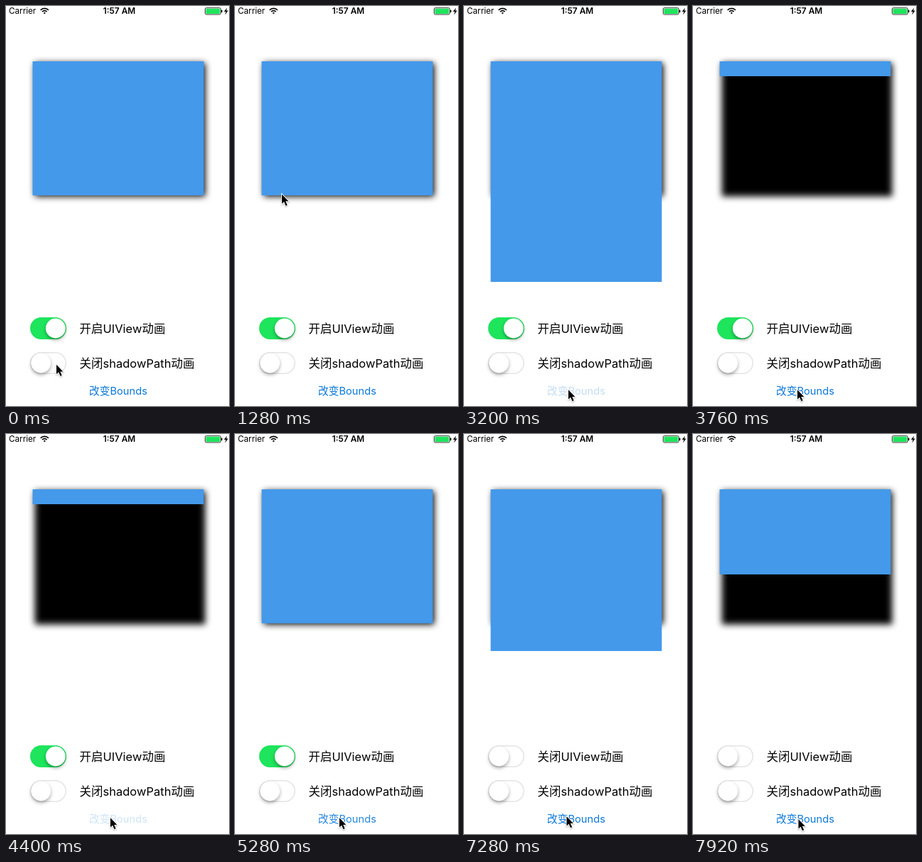
An HTML page with a canvas that plays this animation: 314 by 564 pixels, repeating every 8 s.

```html
<!DOCTYPE html>
<html lang="zh">
<head>
<meta charset="utf-8">
<title>Shadow path demo</title>
<style>
  html, body { margin: 0; width: 100%; height: 100%; overflow: hidden; background: #fff; }
  canvas { display: block; width: 314px; height: 564px; }
</style>
</head>
<body>
<canvas id="stage"></canvas>
<script>
const W = 314, H = 564, LOOP = 8000;
const FONT = '"Inter", "Noto Sans CJK SC", "Noto Sans CJK", sans-serif';
const BLUE = '#4499ea', TINT = '#0a78d9', GREEN = '#1ee55c';
const BOX = { x: 37.5, y: 78, w: 241, h: 189 };
const TOGGLE = 6940;   // the first switch goes off and resizing stops being animated
const FADE = 470, RESIZE = 500, DELAY = 50;

const taps = [
  { up: 2092, hold: 90, height: 311 },
  { up: 3172, hold: 90, height: 21 },
  { up: 4870, hold: 540, height: 228 },
  { up: 7410, hold: 90, height: 120 }
];

const canvas = document.getElementById('stage');
const ctx = canvas.getContext('2d');
const dpr = window.devicePixelRatio || 1;
canvas.width = W * dpr;
canvas.height = H * dpr;

const clamp = v => Math.max(0, Math.min(1, v));
const ease = v => { v = clamp(v); return v * v * (3 - 2 * v); };
const mix = (a, b, k) => a + (b - a) * k;

function boxHeight(t) {
  return taps.reduce((h, { up, height }) => {
    const since = t - up - DELAY;
    if (since < 0) return h;
    return up > TOGGLE ? height : mix(h, height, ease(since / RESIZE));
  }, BOX.h);
}

function buttonAlpha(t) {
  const tap = taps.findLast(({ up, hold }) => t >= up - hold);
  return tap ? mix(0.2, 1, clamp((t - tap.up) / FADE)) : 1;
}

function pointerAt(t) {
  let x = 70.5, y = 504.5;
  const glide = (toX, toY, start, end) => {
    const k = ease((t - start) / (end - start));
    x = mix(x, toX, k);
    y = mix(y, toY, k);
  };
  glide(199, 222, 100, 860);     // along the shadow
  glide(54, 268, 950, 1350);
  glide(146.5, 540, 1420, 1860); // button
  glide(114, 510.5, 5440, 6380);
  glide(62, 456, 6520, 6820);    // first switch
  glide(148, 542, 7020, 7320);   // button again
  return [x, y];
}

function pill(x, y, w, h, r, color) {
  ctx.beginPath();
  ctx.roundRect(x, y, w, h, r);
  ctx.fillStyle = color;
  ctx.fill();
}

function text(str, x, y, size, { color = '#000', weight = 400, align = 'left' } = {}) {
  ctx.font = `${weight} ${size}px ${FONT}`;
  ctx.textAlign = align;
  ctx.fillStyle = color;
  ctx.fillText(str, x, y);
}

function shadow(color, blur, dx, dy) {
  ctx.shadowColor = color;
  ctx.shadowBlur = blur * dpr;
  ctx.shadowOffsetX = dx * dpr;
  ctx.shadowOffsetY = dy * dpr;
}

function drawWifi(x, y) {
  ctx.strokeStyle = '#000';
  ctx.lineWidth = 1.7;
  for (const r of [1.5, 4.8, 8]) {
    ctx.beginPath();
    ctx.arc(x, y, r, -Math.PI * 0.75, -Math.PI * 0.25);
    ctx.stroke();
  }
}

function drawStatus() {
  text('Carrier', 4, 11.3, 11.7);
  text('1:57 AM', 159.5, 11.3, 11.9, { weight: 600, align: 'center' });
  drawWifi(54.3, 11.4);

  ctx.lineWidth = 0.8;
  ctx.beginPath();
  ctx.roundRect(280.4, 2.6, 22, 9.4, 1.8);
  ctx.stroke();
  pill(281.5, 3.7, 19.8, 7.2, 0.8, GREEN);
  pill(303, 5.6, 1.5, 3.6, 0.7, '#000');
  ctx.fillStyle = '#000';
  ctx.fill(new Path2D('M311.2 2.4L307 8h2.6l-1.2 4.4 4.4-6h-2.6z'));
}

function drawBox(t) {
  const { x, y, w, h } = BOX;
  // The caster stands off stage, so only its soft shadow shows
  ctx.save();
  shadow('#000', 9, 2 * W + 2.2, 2.2);
  ctx.fillStyle = '#000';
  ctx.fillRect(x - 2 * W, y, w, h);
  ctx.restore();

  ctx.fillStyle = BLUE;
  ctx.fillRect(x, y, w, boxHeight(t));
}

function drawSwitch(y, on) {
  const x = 34, w = 51, h = 31, rim = 1.5;
  pill(x, y, w, h, h / 2, '#e4e4e4');
  pill(x + rim, y + rim, w - 2 * rim, h - 2 * rim, h / 2 - rim, '#fff');
  ctx.save();
  ctx.globalAlpha = on;
  pill(x, y, w, h, h / 2, GREEN);
  ctx.restore();

  ctx.save();
  shadow('rgba(0,0,0,0.34)', 5, 0, 2.6);
  ctx.beginPath();
  ctx.arc(mix(49.2, 69.8, on), y + h / 2, 13.9, 0, Math.PI * 2);
  ctx.fillStyle = '#fff';
  ctx.fill();
  ctx.restore();
}

const arrow = new Path2D('M.5 1.2V14.4l3.1-2.7 2.4 5.6 2.2-1-2.4-5.4h4.1z');

function drawPointer(t) {
  ctx.save();
  ctx.translate(...pointerAt(t));
  ctx.strokeStyle = '#fff';
  ctx.lineWidth = 1.8;
  shadow('rgba(0,0,0,0.3)', 2, 0, 1);
  ctx.stroke(arrow);
  ctx.shadowColor = 'transparent';
  ctx.fillStyle = '#000';
  ctx.fill(arrow);
  ctx.restore();
}

function draw(t) {
  ctx.setTransform(dpr, 0, 0, dpr, 0, 0);
  ctx.fillStyle = '#fff';
  ctx.fillRect(0, 0, W, H);
  drawStatus();
  drawBox(t);

  drawSwitch(439, 1 - ease((t - TOGGLE) / 260));
  drawSwitch(488, 0);
  text(`${t < TOGGLE ? '开启' : '关闭'}UIView动画`, 103.5, 460.5, 16.5);
  text('关闭shadowPath动画', 103.5, 509.5, 16.5);

  ctx.globalAlpha = buttonAlpha(t);
  text('改变Bounds', 158, 547.8, 14.7, { color: TINT, align: 'center' });
  ctx.globalAlpha = 1;
  drawPointer(t);
}

const begin = performance.now();
function frame() {
  draw((performance.now() - begin) % LOOP);
  requestAnimationFrame(frame);
}
frame();
</script>
</body>
</html>
```
